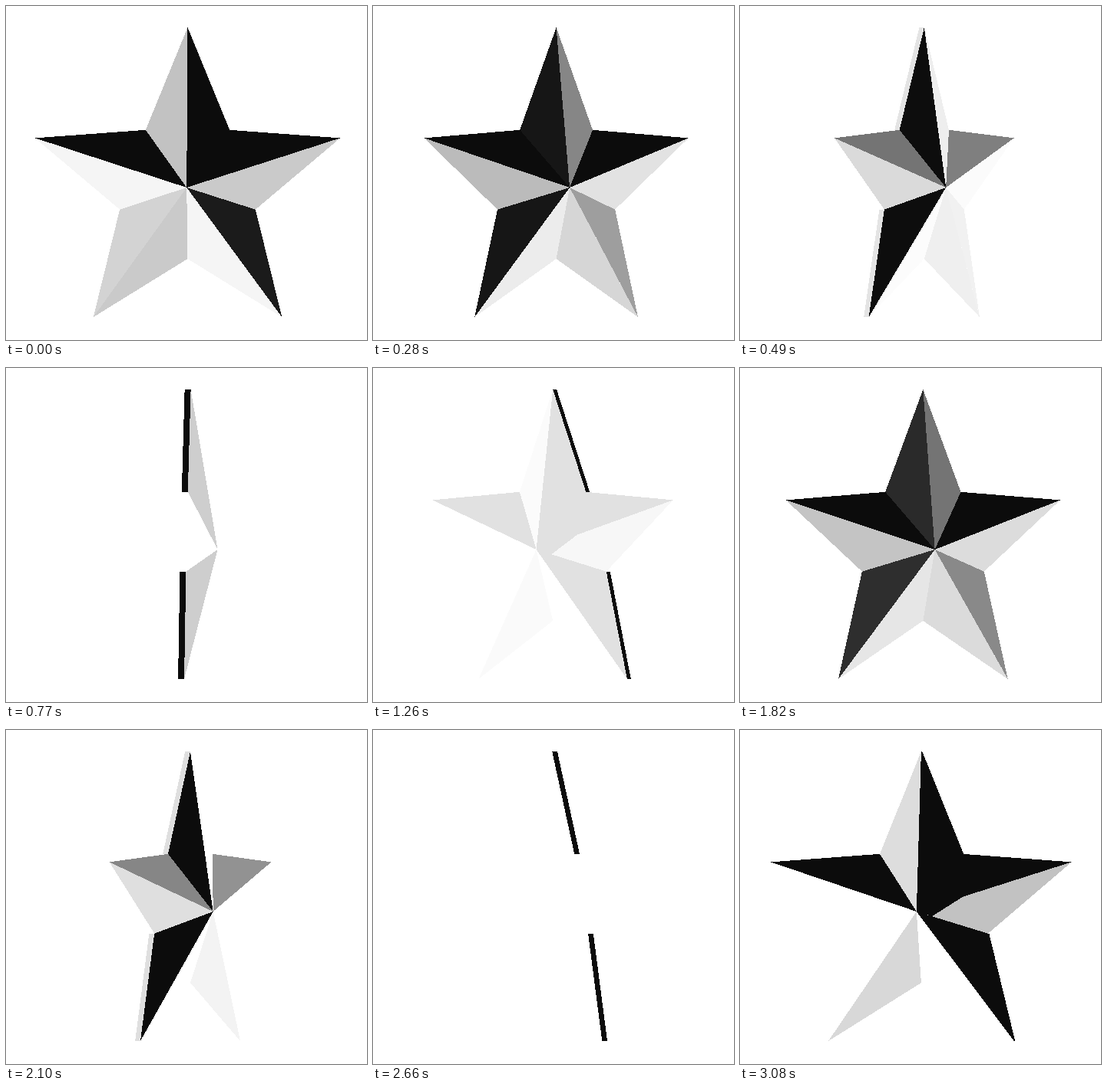
An HTML page without scripts that plays this animation: 470 px wide and 436 px high, repeating every 3150 ms.

```html
<!DOCTYPE html>
<html lang="en">
<head>
<meta charset="utf-8">
<title>Turning star</title>
<style>
@property --t { syntax: "<number>"; inherits: true; initial-value: -2; }

html, body { margin: 0; width: 100%; height: 100%; overflow: hidden; background: #fff; }

svg {
  display: block;
  width: 470px;
  height: 436px;
  shape-rendering: crispEdges;
  animation: turn 3150ms infinite;
}

/* Both sides of the star are alike, so the angle wraps every half turn. */
@keyframes turn {
  0%      { --t: -2;  animation-timing-function: steps(12); }
  26.66%  { --t: 94;  animation-timing-function: step-end; }
  26.665% { --t: -86; animation-timing-function: steps(22); }
  75.55%  { --t: 90;  animation-timing-function: step-end; }
  75.555% { --t: -90; animation-timing-function: steps(11); }
  100%    { --t: -2; }
}

/* Weights of the tones a to f, which hold at -10, -2, 2, 30, 58 and 86 degrees. */
.star {
  --sin: sin(calc(var(--t) * 1deg));
  --cos: cos(calc(var(--t) * 1deg));
  --wa: max(0, min((var(--t) + 42) / 32, (-2 - var(--t)) / 8));
  --wb: max(0, min((var(--t) + 10) / 8, (2 - var(--t)) / 4));
  --wc: max(0, min((var(--t) + 2) / 4, (30 - var(--t)) / 28));
  --wd: max(0, min((var(--t) - 2) / 28, (58 - var(--t)) / 28));
  --we: max(0, min((var(--t) - 30) / 28, (86 - var(--t)) / 28));
  --wf: max(0, min((var(--t) - 58) / 28, 1));
}

/* A facet slopes from the peak (height 39) towards the direction n. */
.face {
  --tone: calc(var(--wa) * var(--a) + var(--wb) * var(--b) + var(--wc) * var(--c)
    + var(--wd) * var(--d) + var(--we) * var(--e) + var(--wf) * var(--f));
  --v: calc(255 - 243 * var(--tone));
  fill: rgb(var(--v), var(--v), var(--v));
  transform: matrix(
    calc(var(--cos) - 0.4425 * sin(var(--n)) * var(--sin)), 0,
    calc(0.4425 * cos(var(--n)) * var(--sin)), 1,
    calc(39 * var(--sin)), 0);
}

/* A wall follows the rim line x = m * y + q through the star's thickness. */
.wall {
  fill: #0c0c0c;
  transform: matrix(var(--sin), 0, calc(var(--m) * var(--cos)), 1, calc(var(--q) * var(--cos)), 0);
}
.left  { opacity: calc(var(--we) * 0.13 + var(--wf)); }
.right { opacity: clamp(0, var(--t) * -0.1, 1); }
.upper { --m: 0.4088; --q: 85.44; }
.lower { --m: 0.245; --q: 81.37; }
.upper.left { --m: -0.4088; --q: -85.44; }
.lower.left { --m: -0.245; --q: -81.37; }
</style>
</head>
<body>
<svg viewBox="0 0 470 436" role="img" aria-label="A faceted star turning">
  <g transform="translate(236.6 237)">
    <g class="star">
      <rect class="wall upper left" x="-4" y="-209" width="8" height="133.8"/>
      <rect class="wall lower left" x="-4" y="28.7" width="8" height="140.4"/>
      <rect class="wall upper right" x="-4" y="-209" width="8" height="133.8"/>
      <rect class="wall lower right" x="-4" y="28.7" width="8" height="140.4"/>

      <!-- Facets from right to left -->
      <polygon class="face" points="0,0 54.7,-75.2 198.8,-64.6" style="--n:4.24deg;--a:1;--b:1;--c:1;--d:1;--e:.45;--f:0"/>
      <polygon class="face" points="0,0 198.8,-64.6 88.4,28.7" style="--n:139.76deg;--a:.25;--b:.22;--c:.3;--d:.12;--e:0;--f:0"/>
      <polygon class="face" points="0,0 59.6,-19.4 19.2,6.2" style="--n:139.76deg;--a:1;--b:.22;--c:.3;--d:.12;--e:0;--f:0"/>
      <polygon class="face" points="0,0 88.4,28.7 122.8,169.1" style="--n:76.24deg;--a:1;--b:.94;--c:1;--d:.4;--e:0;--f:0"/>
      <polygon class="face" points="0,0 0,-209 54.7,-75.2" style="--n:67.76deg;--a:1;--b:1;--c:1;--d:.5;--e:0;--f:0"/>
      <polygon class="face" points="0,0 122.8,169.1 0,93" style="--n:211.76deg;--a:0;--b:.04;--c:.01;--d:.17;--e:.05;--f:0"/>
      <polygon class="face" points="0,0 0,93 -122.8,169.1" style="--n:-211.76deg;--a:.16;--b:.22;--c:.25;--d:.08;--e:0;--f:0"/>
      <polygon class="face" points="0,0 -54.7,-75.2 0,-209" style="--n:-67.76deg;--a:.14;--b:.25;--c:.38;--d:.96;--e:1;--f:.2"/>
      <polygon class="face" points="0,0 -122.8,169.1 -88.4,28.7" style="--n:-76.24deg;--a:0;--b:.18;--c:.25;--d:.96;--e:1;--f:.2"/>
      <polygon class="face" points="0,0 -198.8,-64.6 -54.7,-75.2" style="--n:-4.24deg;--a:1;--b:1;--c:1;--d:1;--e:.5;--f:0"/>
      <polygon class="face" points="0,0 -88.4,28.7 -198.8,-64.6" style="--n:-139.76deg;--a:0;--b:.04;--c:.02;--d:.28;--e:.13;--f:0"/>
    </g>
  </g>
</svg>
</body>
</html>
```
